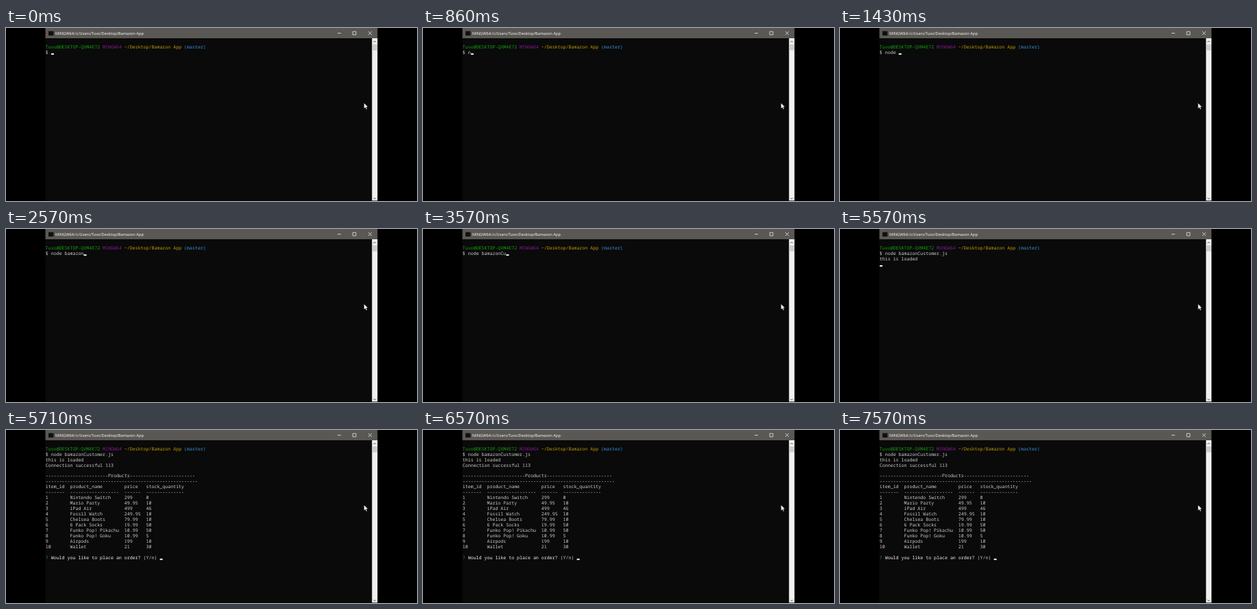
These frames come from a looping animation (600 by 253 pixels, 8000 ms). An HTML page:

```html
<!DOCTYPE html>
<html lang="en">
<head>
<meta charset="utf-8">
<title>Terminal</title>
<style>
  html, body { margin: 0; width: 100%; height: 100%; overflow: hidden; background: #000; }
  svg { display: block; width: 100vw; height: 100vh; }
  text { white-space: pre; text-rendering: geometricPrecision; }
  #screen text { font: 6.61px "Noto Sans Mono", "DejaVu Sans Mono", monospace; fill: #ccc; }
  .title { font: 5.73px "Open Sans", "Noto Sans", sans-serif; fill: #fff; }
  .line { fill: none; stroke: #fff; stroke-width: .7; }
  .arrow { fill: none; stroke: #505050; stroke-width: 1; }
</style>
</head>
<body>
<svg viewBox="0 0 600 253" xmlns="http://www.w3.org/2000/svg">
  <rect width="600" height="253" fill="#000"/>
  <rect x="57.5" y="15" width="477" height="237.4" fill="#0a0a0a"/>
  <rect x="57.5" width="484.8" height="15" fill="#5a5854"/>
  <rect x="62" y="4.6" width="7.4" height="6.4" fill="#111"/>
  <text class="title" x="72" y="9.8">MINGW64:/c/Users/Tuvo/Desktop/Bamazon App</text>
  <path class="line" d="M484 7.6h5M506.2 5.2h4.7v4.7h-4.7zM529 5l5 5M534 5l-5 5"/>
  <rect x="534.3" y="15" width="8" height="237.4" fill="#f0f0f0"/>
  <rect x="534.8" y="24" width="7" height="8.6" fill="#cdcdcd"/>
  <path class="arrow" d="M536.5 20.8l1.8-1.8 1.8 1.8M536.5 248.4l1.8 1.8 1.8-1.8"/>
  <g id="screen"></g>
  <rect id="cursor" width="4" height="2" fill="#f2f2f2"/>
  <path d="M522.7 109.8v8l1.9-1.7 1.3 2.9 1.3-.6-1.3-2.8h2.5z" fill="#fff" stroke="#000" stroke-width=".3"/>
</svg>
<script>
const LOOP = 8000, LEFT = 57.8, COL = 3.967, ROW = 7.95, BASE = 29.7;
const GREEN = '#13a10e', PURPLE = '#881798', YELLOW = '#c19c00', BLUE = '#3a96dd', WHITE = '#f2f2f2';
const NS = 'http://www.w3.org/2000/svg';
const screen = document.getElementById('screen');
const cursor = document.getElementById('cursor');

function print(row, col, str, fill) {
  const el = document.createElementNS(NS, 'text');
  el.setAttribute('x', LEFT + col * COL);
  el.setAttribute('y', BASE + row * ROW);
  if (fill) el.style.fill = fill;
  el.textContent = str;
  screen.append(el);
  return el;
}

const dash = n => '-'.repeat(n);
const record = (id, name, price, stock) =>
  id.padEnd(9) + name.padEnd(20) + price.padEnd(8) + stock;

print(0, 0, 'Tuvo@DESKTOP-QXM4E72', GREEN);
print(0, 21, 'MINGW64', PURPLE);
print(0, 29, '~/Desktop/Bamazon App', YELLOW);
print(0, 51, '(master)', BLUE);
const command = print(1, 0, '$ ');
const loaded = print(2, 0, 'this is loaded');

const products = [
  ['Nintendo Switch', '299', '0'],
  ['Mario Party', '49.95', '10'],
  ['iPad Air', '499', '46'],
  ['Fossil Watch', '249.95', '10'],
  ['Chelsea Boots', '79.99', '10'],
  ['6 Pack Socks', '19.99', '50'],
  ['Funko Pop! Pikachu', '10.99', '50'],
  ['Funko Pop! Goku', '10.99', '5'],
  ['Airpods', '199', '10'],
  ['Wallet', '21', '30']
];
const listing = [
  'Connection successful 113',
  '',
  dash(23) + 'Products' + dash(24),
  dash(56),
  record('item_id', 'product_name', 'price', 'stock_quantity'),
  record(dash(7), dash(18), dash(6), dash(14)),
  ...products.map((p, i) => record(String(i + 1), ...p))
].map((str, i) => print(3 + i, 0, str));
listing.push(
  print(20, 0, '?', GREEN),
  print(20, 2, 'Would you like to place an order?', WHITE),
  print(20, 36, '(Y/n)')
);

// [start ms, characters typed]; the jumps are tab completions
const COMMAND = 'node bamazonCustomer.js ';
const typing = [
  [0, 0], [860, 1], [1000, 2], [1140, 3], [1290, 4], [1430, 5],
  [2000, 6], [2140, 7], [2290, 8], [2570, 12],
  [3290, 13], [3430, 14], [3860, 24]
];
const ENTER = 4860, LOADED = 5430, LISTED = 5710;
// [from, to] spans where the cursor is blinked off
const blinks = [[140, 570], [1860, 2000], [3000, 3290], [4430, 4860], [6000, 6570], [7000, 7570]];

const show = (el, on) => el.setAttribute('visibility', on ? 'visible' : 'hidden');

function cursorCell(t, typed) {
  if (t >= LISTED) return [20, 42];
  if (t >= LOADED) return [3, 0];
  if (t >= ENTER) return [2, 0];
  return [1, 2 + typed];
}

function draw(t) {
  const typed = typing.filter(s => s[0] <= t).pop()[1];
  command.textContent = '$ ' + COMMAND.slice(0, typed);
  show(loaded, t >= LOADED);
  listing.forEach(el => show(el, t >= LISTED));
  const [row, col] = cursorCell(t, typed);
  cursor.setAttribute('x', LEFT + .2 + col * COL);
  cursor.setAttribute('y', 37.1 + (row - 1) * ROW);
  show(cursor, !blinks.some(([from, to]) => t >= from && t < to));
}

const start = performance.now();
function tick() {
  draw((performance.now() - start) % LOOP);
  requestAnimationFrame(tick);
}
tick();
</script>
</body>
</html>
```
